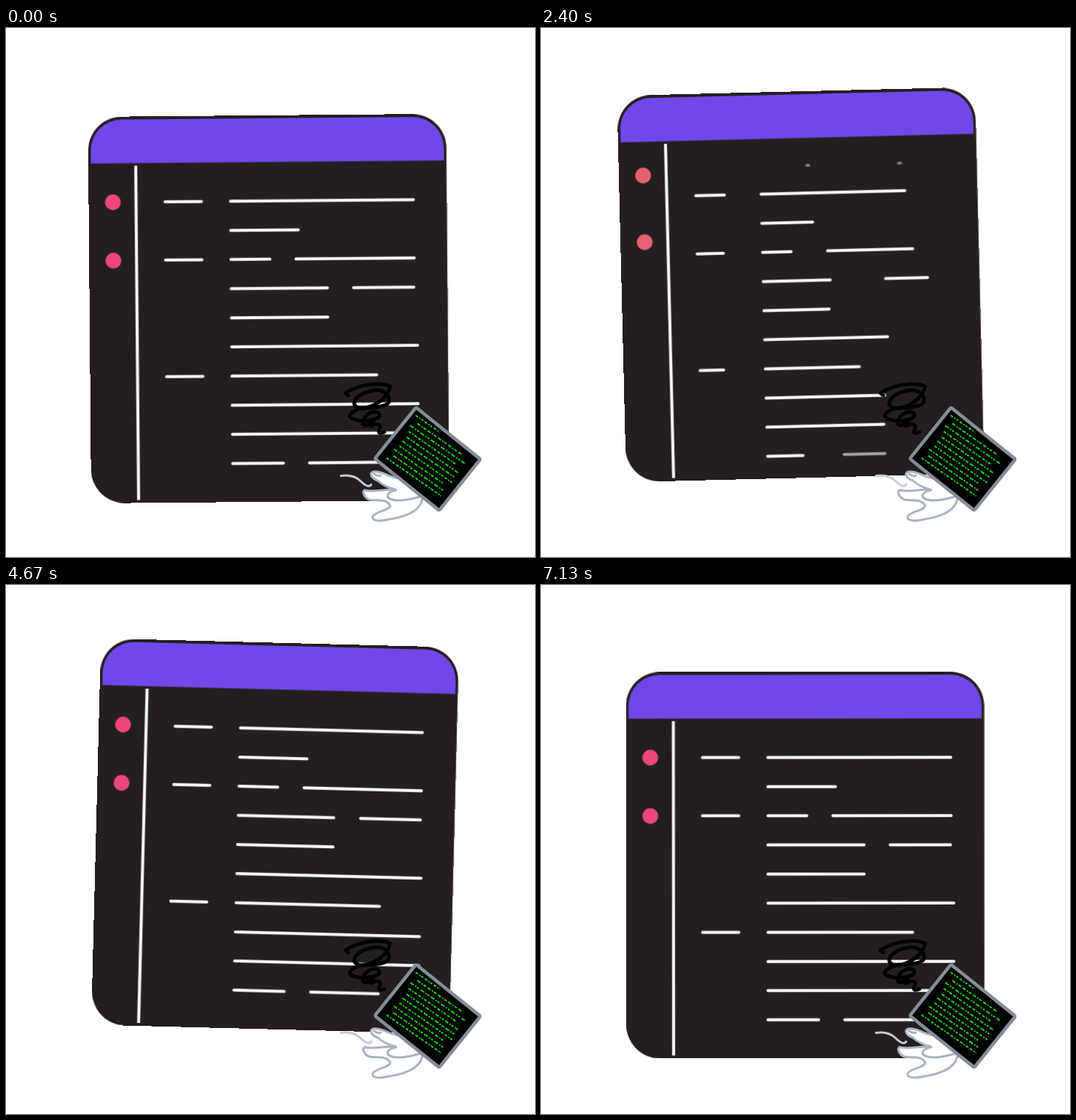
These frames come from a looping animation (720 by 720 pixels, 7190 ms). An HTML page:

```html
<!DOCTYPE html>
<html lang="en">
<head>
<meta charset="utf-8">
<title>Code window</title>
<style>
  html, body { margin: 0; width: 100%; height: 100%; overflow: hidden; background: #fff; }
  svg { display: block; width: 100vw; height: 100vh; }
  :root { --sway: 898.75ms; --cycle: 3595ms; --sine: cubic-bezier(.37, 0, .63, 1); }

  .bob { animation: bob var(--sway) var(--sine) -1724ms infinite alternate; }
  .tilt {
    transform-origin: 180.5px 640px;
    animation: tilt var(--sway) var(--sine) -1421ms infinite alternate;
  }
  @keyframes bob { from { transform: translateY(3.2px); } to { transform: translateY(-45.2px); } }
  @keyframes tilt { from { transform: rotate(-1.95deg); } to { transform: rotate(1.95deg); } }

  .rows { animation: drop var(--cycle) ease-in-out infinite; }
  @keyframes drop {
    0%, 28%, 80%, 100% { transform: translateY(0); }
    50% { transform: translateY(54.5px); }
  }

  .code line {
    stroke: #fff; stroke-width: 4; stroke-linecap: round;
    animation: trim var(--cycle) ease-in-out infinite;
  }
  @keyframes trim {
    0%, 28%, 80%, 100% { stroke-dasharray: var(--long) 600; opacity: min(1, var(--long)); }
    50% { stroke-dasharray: var(--short) 600; opacity: min(1, var(--short)); }
  }

  .dot {
    fill: #ec4778;
    animation: move var(--cycle) ease-in-out infinite, tint var(--cycle) ease-in-out infinite;
  }
  .upper { --near: 6.8px; --far: -21px; }
  .lower { --near: -6.8px; --far: 15px; }
  @keyframes move {
    0%, 28%, 97%, 100% { transform: translateY(0); }
    50% { transform: translateY(var(--near)); }
    83.3% { transform: translateY(var(--far)); }
  }
  @keyframes tint {
    0%, 30%, 72%, 100% { fill: #ec4778; }
    46%, 54% { fill: #cad260; }
  }

  .ink { fill: none; stroke: #000; stroke-width: 5; }
  .hand { fill: #fff; stroke: #aab3bc; stroke-width: 3; }
  .ink, .hand { stroke-linecap: round; stroke-linejoin: round; }
  .open { fill: none; }
  .screen line { stroke: #13d41d; stroke-width: 2; }
</style>
</head>
<body>
<svg viewBox="0 0 720 720">
  <g class="bob"><g class="tilt">
    <rect x="116" y="118" width="487.5" height="526" rx="46" fill="#231f20"/>
    <path d="M119.5 181.5V164a42 42 0 0 1 42-42H558a42 42 0 0 1 42 42V181.5Z" fill="#7048e8"/>
    <path d="M180.5 185V640" stroke="#fff" stroke-width="4"/>
    <circle class="dot upper" cx="149" cy="234.5" r="10.7"/>
    <circle class="dot lower" cx="149" cy="314" r="10.7"/>
    <g class="code header"></g>
    <g class="code rows"></g>
  </g></g>

  <path class="ink" d="M466 500L462 497C477 487 507 480 523 488C519 505 498 519 480 517
    C467 513 476 498 497 494C513 490 523 499 521 509C518 518 490 516 478 519
    C469 524 465 528 470 531C482 537 501 535 508 529C511 519 490 520 486 535
    C483 544 496 542 501 533L492 535 497 542C505 537 512 540 509 545Q504 554 515 550"/>
  <g class="hand">
    <path class="open" stroke="#c5cad0" d="M456 609.5Q473 607 483 617T497 621.5"/>
    <path d="M535 613C522 612 511 602 500 604C493 606 498 613 506 616Q516 625 530 628
      C515 628 500 632 488 629C484 631 488 640 495 642C506 644 517 640 523 650
      C522 657 502 658 499 665C498 672 511 671 520 669Q567 662 567 637L556 620Z"/>
    <path class="open" d="M531 629Q517 632 520 639C528 646 549 642 563 638M501 607Q507 611 510 609"/>
  </g>
  <g transform="translate(558 516) rotate(38.8)">
    <rect x=".3" y=".3" width="112.5" height="89.5" rx="2" fill="#000" stroke="#858d97" stroke-width="4.6"/>
    <g class="screen" transform="rotate(-4)"></g>
  </g>
</svg>
<script>
  const LOOP = 7190, STEPS = 108, STEP = LOOP / STEPS;
  const find = selector => document.querySelector(selector);

  function addLine(parent, x, y, length) {
    const line = document.createElementNS('http://www.w3.org/2000/svg', 'line');
    const place = { x1: x, x2: x + length, y1: y, y2: y };
    for (const key in place) line.setAttribute(key, place[key]);
    parent.append(line);
    return line;
  }

  function addCode(parent, x, y, long, short) {
    const { style } = addLine(parent, x, y, Math.max(long, short));
    style.setProperty('--long', long);
    style.setProperty('--short', short);
  }

  // Each row has a body, sometimes a tag before it and a tail after it;
  // lower rows are trimmed further.
  const TAG = 220, BODY = 309, GAP = 35.5;
  const bodies = [249, 92, 53, 131, 131, 253, 197, 253, 253, 69];
  const tags = [0, 2, 6], tails = { 2: 161, 3: 82, 9: 93 };
  bodies.forEach((body, i) => {
    const rows = find('.rows'), y = 234.5 + i * 39.67, keep = 0.47 * 0.81 ** i;
    const tail = tails[i];
    addCode(rows, BODY, y, body, Math.max(18, body * keep));
    if (tags.includes(i)) addCode(rows, TAG, y, 49.5, 49.5 * keep);
    if (tail) addCode(rows, BODY + body + GAP, y, tail, keep > 0.1 ? tail * keep : 0);
  });
  for (const x of [372, 497]) addCode(find('.header'), x, 219, 0, 7);

  // Tiny code on the tablet
  let seed = 7;
  const random = () => (seed = seed * 16807 % 2147483647) / 2147483647;
  for (let i = 0; i < 10; i++) {
    const from = 6 + 9 * random(), to = i ? 80 + 25 * random() : 46;
    addLine(find('.screen'), from, 9.5 + i * 7.8, to - from)
      .setAttribute('stroke-dasharray', `${4 + i % 3} 2 2 1.5 ${3 + i % 2} 2.5`);
  }

  // All motion advances in fixed steps
  const motions = document.getAnimations();
  motions.forEach(motion => motion.pause());
  const start = performance.now();
  function tick() {
    const time = (performance.now() - start) % LOOP;
    const step = Math.floor((time + 4) / STEP) % STEPS;
    motions.forEach(motion => { motion.currentTime = step * STEP; });
    requestAnimationFrame(tick);
  }
  tick();
</script>
</body>
</html>
```
